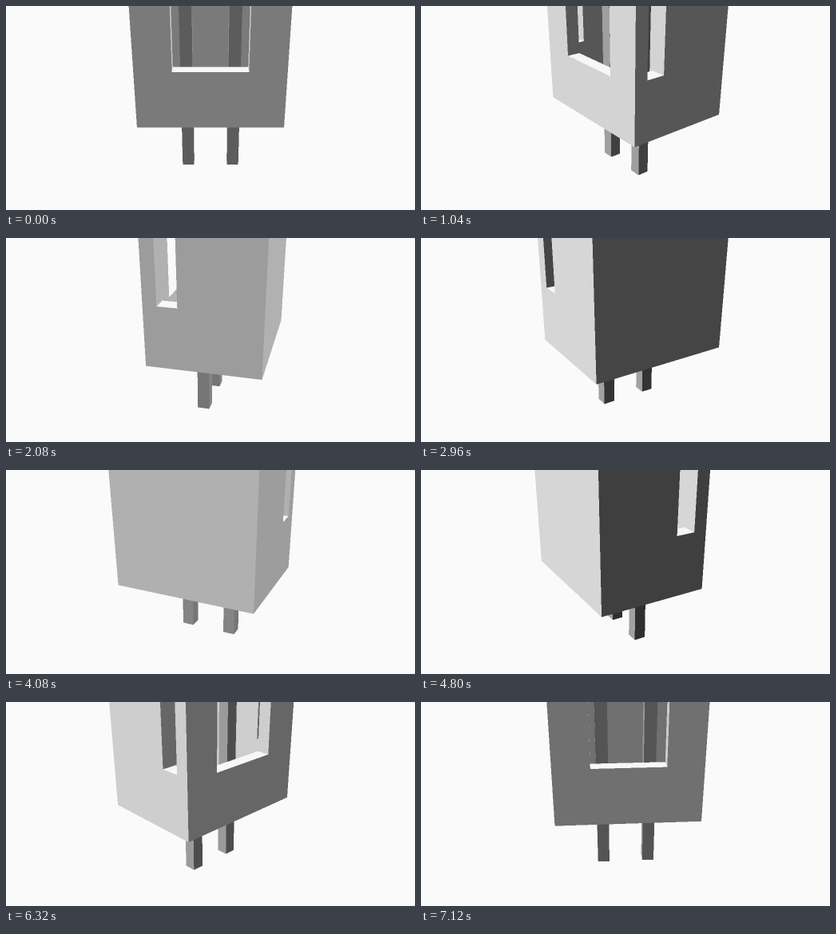
Write an HTML page with a canvas that moves like this. It is 512 by 256 pixels and loops after 7200 ms.

```html
<!DOCTYPE html>
<html>
<head>
<meta charset="utf-8">
<style>
html, body { margin: 0; width: 100%; height: 100%; overflow: hidden; background: #fafafa; }
canvas { display: block; width: 512px; height: 256px; }
</style>
</head>
<body>
<canvas id="stage" width="512" height="256"></canvas>
<script>
const W = 512, H = 256, SS = 2;
const STEPS = 90, STEP_MS = 80;
const DIST = 28, FOCAL = H / 2 / Math.tan(Math.PI / 16);
const TILT = 25 * Math.PI / 180, CT = Math.cos(TILT), ST = Math.sin(TILT);
const BACKGROUND = 250, TOP = 7;

// Boxes in millimetres: [x0, x1, y0, y1, z0, z1], y up, z to the front.
const boxes = [];
const add = (tint, ...b) => boxes.push({ b, tint });
const addPair = (tint, x0, x1, ...rest) => {
  add(tint, x0, x1, ...rest);
  add(tint, -x1, -x0, ...rest);
};
add(1, -3.7, 3.7, 0, 0.8, -3.4, 2.35);            // base
add(1, -3.7, 3.7, 0.8, TOP, -3.4, -2.6);          // back wall
add(1, -3.7, 3.7, 0.8, 3, 1.65, 2.35);            // front sill
addPair(1, 1.85, 3.7, 3, TOP, 1.65, 2.35);        // front pillars
addPair(1, 2.9, 3.7, 0.8, TOP, -2.6, 0.65);       // side walls
addPair(1, 2.9, 3.7, 0.8, 3.2, 0.65, 1.65);       // slot sills
addPair(0.753, 0.93, 1.57, -3.4, TOP, -0.32, 0.32); // pins

const bw = W * SS, bh = H * SS, scale = FOCAL * SS;
const buffer = document.createElement('canvas');
buffer.width = bw;
buffer.height = bh;
const bctx = buffer.getContext('2d');
const image = bctx.createImageData(bw, bh);
const pixels = new Uint32Array(image.data.buffer);
const depth = new Float64Array(bw * bh);
const ctx = document.getElementById('stage').getContext('2d');

const grey = v => (0xff000000 | Math.min(255, Math.round(v)) * 0x10101) >>> 0;

// Vector to view space: right, up, towards the viewer.
function turn([x, y, z], c, s) {
  const rz = x * s + z * c;
  return [x * c - z * s, y * CT - rz * ST, y * ST + rz * CT];
}

// Two opposite lights act like one light with an absolute dot product.
const shade = ([x, y, z]) => 51 + 255 * Math.abs(-x + y + z) / Math.sqrt(3);

function fillFace(points, n, colour) {
  const [px, py, pz] = points[0];
  const h = n[0] * px + n[1] * py + n[2] * (pz - DIST);
  if (h >= 0) return;

  const poly = points.map(([x, y, z]) => {
    const k = scale / (DIST - z);
    return [bw / 2 + x * k, bh / 2 - y * k];
  });
  const ys = poly.map(p => p[1]);
  const yStart = Math.max(0, Math.ceil(Math.min(...ys) - 0.5));
  const yEnd = Math.min(bh, Math.ceil(Math.max(...ys) - 0.5));
  const dw = n[0] / (scale * h);

  for (let row = yStart; row < yEnd; row++) {
    const y = row + 0.5;
    let left = Infinity, right = -Infinity;
    for (let i = 0; i < 4; i++) {
      const a = poly[i], b = poly[(i + 1) % 4];
      if ((a[1] <= y) === (b[1] <= y)) continue;
      const x = a[0] + (y - a[1]) / (b[1] - a[1]) * (b[0] - a[0]);
      left = Math.min(left, x);
      right = Math.max(right, x);
    }
    const x0 = Math.max(0, Math.ceil(left - 0.5));
    const x1 = Math.min(bw, Math.ceil(right - 0.5));
    // Inverse distance is linear across the screen.
    let w = (n[0] * (x0 + 0.5 - bw / 2) + n[1] * (bh / 2 - y) - n[2] * scale) / (scale * h);
    for (let i = row * bw + x0, end = row * bw + x1; i < end; i++, w += dw) {
      if (w > depth[i]) {
        depth[i] = w;
        pixels[i] = colour;
      }
    }
  }
}

function drawBox({ b, tint }, c, s) {
  for (let axis = 0; axis < 3; axis++) {
    const u = (axis + 1) % 3, v = (axis + 2) % 3;
    for (let side = 0; side < 2; side++) {
      const normal = [0, 0, 0];
      normal[axis] = side ? 1 : -1;
      const n = turn(normal, c, s);
      const corners = [[0, 0], [1, 0], [1, 1], [0, 1]].map(([i, j]) => {
        const p = [];
        p[axis] = b[axis * 2 + side];
        p[u] = b[u * 2 + i];
        p[v] = b[v * 2 + j];
        return turn(p, c, s);
      });
      fillFace(corners, n, grey(shade(n) * tint));
    }
  }
}

function render(step) {
  const angle = step / STEPS * 2 * Math.PI;
  const c = Math.cos(angle), s = Math.sin(angle);
  pixels.fill(grey(BACKGROUND));
  depth.fill(0);
  for (const box of boxes) drawBox(box, c, s);
  bctx.putImageData(image, 0, 0);
  ctx.drawImage(buffer, 0, 0, W, H);
}

let shown = -1;
const start = performance.now();
function tick() {
  const step = Math.floor((performance.now() - start) / STEP_MS) % STEPS;
  if (step !== shown) render(shown = step);
  requestAnimationFrame(tick);
}
tick();
</script>
</body>
</html>
```
